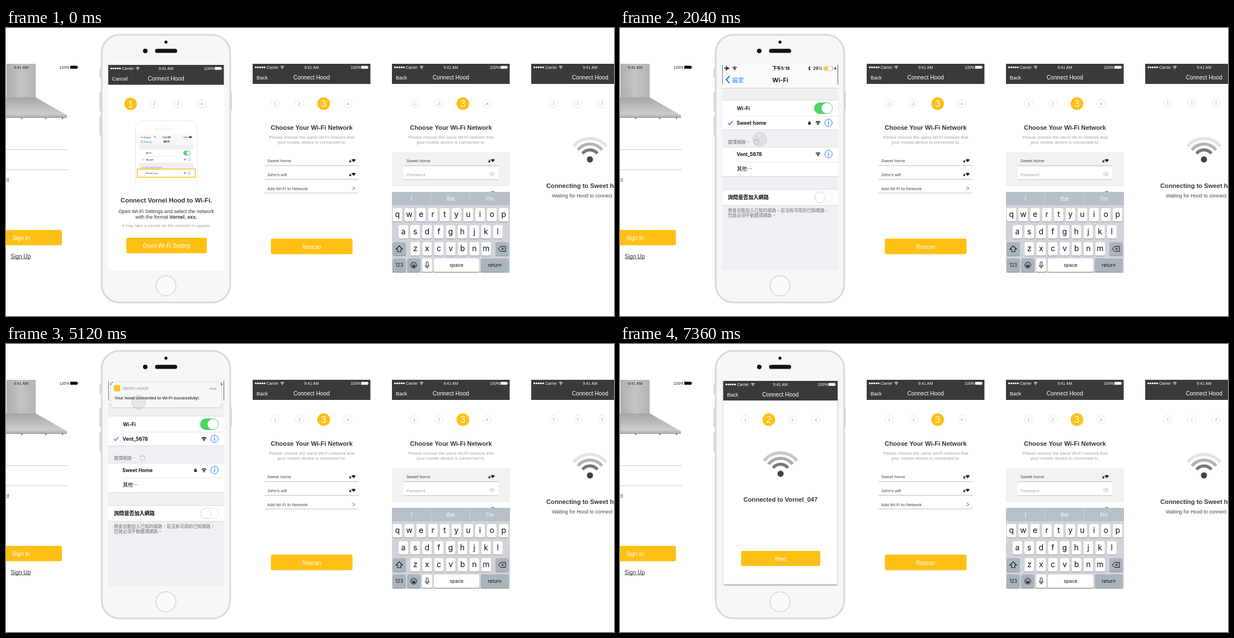
An HTML page with a canvas for the animation above (8.52 s loop, 1087 by 515 pixels).

```html
<!DOCTYPE html>
<html lang="en">
<head>
<meta charset="utf-8">
<title>Hood setup flow</title>
<style>
html, body { margin: 0; width: 100%; height: 100%; overflow: hidden; background: #fff; }
canvas { display: block; }
</style>
</head>
<body>
<canvas id="stage" width="1087" height="515"></canvas>
<script>
const LOOP = 8520;
const YELLOW = '#ffc015', DARK = '#3a3a3a', BLUE = '#0a7aff', INK = '#333';
const SANS = '"Liberation Sans", Arial, sans-serif';
const IOS = 'Inter, "Noto Sans CJK TC", "Noto Sans CJK JP", "Noto Sans CJK", sans-serif';
const stage = document.getElementById('stage').getContext('2d');
let g = stage;

// ---------- helpers ----------
const clamp = v => Math.max(0, Math.min(1, v));
const part = (t, from, to) => clamp((t - from) / (to - from));
const mix = (a, b, p) => a + (b - a) * p;
const easeOut = p => 1 - Math.pow(1 - p, 2.5);
const easeInOut = p => p * p * (3 - 2 * p);
const spring = p => p >= 1 ? 1 : 1 - Math.exp(-8 * p);

function text(s, x, y, size, color = INK, align = 'left', weight = 400, font = SANS) {
  g.font = `${weight} ${size}px ${font}`;
  g.textAlign = align;
  g.fillStyle = color;
  g.fillText(s, x, y + size * 0.36);
}
const center = (s, x, y, size, color, weight) => text(s, x, y, size, color, 'center', weight);
const ios = (s, x, y, size, color = '#000', weight = 600, align = 'left') =>
  text(s, x, y, size, color, align, weight, IOS);

function rect(x1, y1, x2, y2, color) {
  g.fillStyle = color;
  g.fillRect(x1, y1, x2 - x1, y2 - y1);
}
function round(x1, y1, x2, y2, r, fill, stroke, width = 1) {
  g.beginPath();
  g.roundRect(x1, y1, x2 - x1, y2 - y1, r);
  paint(fill, stroke, width);
}
function circle(x, y, r, fill, stroke, width = 1) {
  g.beginPath();
  g.arc(x, y, r, 0, Math.PI * 2);
  paint(fill, stroke, width);
}
function paint(fill, stroke, width) {
  if (fill) { g.fillStyle = fill; g.fill(); }
  if (stroke) { g.strokeStyle = stroke; g.lineWidth = width; g.stroke(); }
}
function path(points, fill, stroke, width = 1, close = false) {
  g.beginPath();
  for (let i = 0; i < points.length; i += 2) g.lineTo(points[i], points[i + 1]);
  if (close) g.closePath();
  paint(fill, stroke, width);
}
function fade(alpha, draw) {
  if (alpha <= 0) return;
  g.save();
  g.globalAlpha *= alpha;
  draw();
  g.restore();
}
function button(x1, y1, x2, y2, label) {
  round(x1, y1, x2, y2, 3, YELLOW);
  center(label, (x1 + x2) / 2, (y1 + y2) / 2 + .5, 10, '#fff');
}

// ---------- icons ----------
function arcs(x, y, radii, colors, width, spread) {
  g.lineWidth = width;
  radii.forEach((r, i) => {
    g.beginPath();
    g.arc(x, y, r, -Math.PI / 2 - spread, -Math.PI / 2 + spread);
    g.strokeStyle = colors[i % colors.length];
    g.stroke();
  });
}
function wifi(x, y, size, color) {
  arcs(x, y + size * .4, [size * .38, size * .72], [color], size * .17, .78);
  circle(x, y + size * .34, size * .14, color);
}
function bigWifi(x, y, outer, middle) {
  arcs(x, y, [17, 27.5, 37.5], ['#777', middle, outer], 5.5, .9);
  circle(x, y, 5.5, '#424242');
}
function wedge(x, y, color = '#222') {
  g.beginPath();
  g.moveTo(x, y + 3.2);
  g.arc(x, y + 3.2, 5.8, -Math.PI / 2 - .74, -Math.PI / 2 + .74);
  g.fillStyle = color;
  g.fill();
}
function lock(x, y, s, color) {
  rect(x - 2 * s, y - .5 * s, x + 2 * s, y + 3 * s, color);
  g.beginPath();
  g.arc(x, y - .8 * s, 1.3 * s, Math.PI, 0);
  paint(null, color, .9 * s);
}
function info(x, y, r) {
  circle(x, y, r, null, BLUE, r * .15);
  rect(x - r * .1, y - r * .2, x + r * .1, y + r * .55, BLUE);
  circle(x, y - r * .48, r * .13, BLUE);
}
const check = (x, y, s) => path([x - 4 * s, y, x - 1.3 * s, y + 3 * s, x + 4 * s, y - 3 * s], null, BLUE, 1.4 * s);
function toggle(x1, y1, x2, y2, on) {
  const r = (y2 - y1) / 2;
  round(x1, y1, x2, y2, r, on ? '#4cd663' : '#fff', on ? '#4cd663' : '#dcdcdc', .8);
  circle(on ? x2 - r : x1 + r, y1 + r, r - .5, '#fff', on ? '#b5ddb9' : '#cfcfcf', .7);
}

// ---------- shared app parts ----------
function header(x, y, w, h, back) {
  const mid = x + w / 2, sy = y + 6.3;
  rect(x, y, x + w, y + h, DARK);
  for (let i = 0; i < 5; i++) circle(x + 5.6 + i * 3.9, sy, 1.6, '#fff');
  text('Carrier', x + 25, sy, 6.8, '#fff');
  wifi(x + 53, sy, 6, '#fff');
  center('9:41 AM', mid, sy, 7, '#fff');
  text('100%', x + w - 17.5, sy, 7, '#fff', 'right');
  rect(x + w - 16.5, sy - 2.5, x + w - 4.5, sy + 2.5, '#fff');
  rect(x + w - 4, sy - 1, x + w - 3, sy + 1, '#fff');
  text(back, x + 7, y + 24.3, 9, '#fff');
  center('Connect Hood', mid, y + 24.3, 10.2, '#fff');
}
function steps(x, gap, active, numSize = 7.5, y = 135) {
  for (let n = 1; n <= 4; n++) {
    const cx = x + (n - 1) * gap;
    if (n === active) {
      circle(cx, y + .3, 11.3, YELLOW);
      center(n, cx, y + .5, 16, '#fff');
    } else {
      circle(cx, y, 7.3, '#fff', '#e6e6e6');
      center(n, cx, y, numSize, '#999');
    }
  }
}
function chooseHead(x) {
  header(x, 64, 210.5, 36, 'Back');
  steps(x + 40.5, 43.2, 3);
  const mid = x + 105.5;
  center('Choose Your Wi-Fi Network', mid, 177.7, 11.2, INK, 700);
  center('Please choose the same Wi-Fi network that', mid, 195, 7.9, '#a0a0a0');
  center('your mobile device is connected to.', mid, 204.5, 7.9, '#a0a0a0');
}
function network(name, x, y) {
  text(name, x, y, 7.7, '#444');
  lock(x + 148.5, y + .3, .8, '#222');
  wedge(x + 154.5, y - .6);
}

// ---------- side screens ----------
function loginScreen() {
  const flue = g.createLinearGradient(0, 0, 53, 0);
  ['#adadad', '#c4c4c4', '#b4b4b4'].forEach((c, i) => flue.addColorStop(i / 2, c));
  rect(1, 64, 53, 125, flue);
  const cone = g.createLinearGradient(0, 124, 0, 157);
  cone.addColorStop(0, '#a6a6a6');
  cone.addColorStop(1, '#d0d0d0');
  path([0, 124, 53, 124, 109, 156, 0, 156], cone);
  rect(0, 155, 109, 160, '#bdbdbd');
  rect(0, 159, 109, 160.5, '#8e8e8e');
  [28, 71, 101].forEach(x => rect(x - 1, 160, x + 1, 163, '#777'));
  center('9:41 AM', 27, 70.3, 7, '#222');
  text('100%', 113.5, 70.3, 7, '#222', 'right');
  rect(115, 67.5, 127.5, 72.8, '#000');
  rect(128, 69, 129, 71, '#000');
  rect(0, 217, 111, 218, '#ccc');
  rect(0, 253, 111, 254, '#ccc');
  text('Forgot password', 5.5, 270.3, 7.7, '#444', 'right');
  rect(0, 274, 5.5, 274.7, '#555');
  button(-46, 361, 100, 388.5, 'Sign In');
  center('Sign Up', 26.3, 408, 10.1, INK);
  rect(8.5, 412.5, 44, 413.3, INK);
}
function listScreen() {
  chooseHead(441);
  network('Sweet home', 467, 237.5);
  network("John's wifi", 467, 262);
  text('Add Wi-Fi to Network', 467, 287, 7.7, '#444');
  path([619.5, 284, 624, 286.8, 619.5, 289.6], null, '#555', .9);
  [246, 270.5, 295].forEach(y => rect(462, y - .5, 630.5, y + .5, '#bdbdbd'));
  button(473.5, 376.5, 619.5, 404.5, 'Rescan');
}
function key(x1, y1, x2, dark, label, size = 14) {
  round(x1, y1 + 1, x2, y1 + 25, 3, '#8d9299');
  round(x1, y1, x2, y1 + 24, 3, dark ? '#abb3bd' : '#fff');
  if (label) text(label, (x1 + x2) / 2, y1 + 12 - (size > 10 ? 1 : 0), size, '#111', 'center', 400, IOS);
}
function keyRow(letters, x, y) {
  [...letters].forEach((c, i) => key(x + i * 21.1 - 8.6, y, x + i * 21.1 + 8.6, false, c));
}
function keyboard() {
  rect(690, 293, 901, 317.5, '#b8bfc8');
  rect(690, 317.5, 901, 438, '#d0d4da');
  [['I', 725], ['the', 795], ["I'm", 865]].forEach(([s, x]) => center(s, x, 305, 10.3, '#fff'));
  rect(759, 296, 759.7, 315, '#d3d8de');
  rect(829, 296, 829.7, 315, '#d3d8de');
  keyRow('qwertyuiop', 699.8, 322);
  keyRow('asdfghjkl', 710.5, 352.5);
  keyRow('zxcvbnm', 731.8, 383);
  key(691.5, 383, 715, true);
  path([703, 389.5, 709, 395.5, 706, 395.5, 706, 400, 700, 400, 700, 395.5, 697, 395.5], null, '#111', 1.1, true);
  key(875, 383, 898.5, true);
  path([880, 395, 884.5, 390.5, 893, 390.5, 893, 399.5, 884.5, 399.5], null, '#111', 1, true);
  path([885.5, 392.7, 890, 397.2], null, '#111');
  path([890, 392.7, 885.5, 397.2], null, '#111');
  key(691.5, 412, 714.5, true, '123', 8.5);
  key(717.5, 412, 740.5, true);
  circle(729, 424, 5.2, null, '#111');
  circle(727.2, 422.4, .8, '#111');
  circle(730.8, 422.4, .8, '#111');
  g.beginPath();
  g.arc(729, 424.5, 3.1, 0, Math.PI);
  g.fillStyle = '#111';
  g.fill();
  key(744, 412, 762, false);
  round(751.2, 418, 754.8, 426, 1.8, null, '#111');
  g.beginPath();
  g.arc(753, 424, 3.7, 0, Math.PI);
  paint(null, '#111', .9);
  path([753, 427.5, 753, 430], null, '#111');
  key(765, 412, 846, false, 'space', 8.6);
  key(849, 412, 898.5, true, 'return', 8.6);
}
function passwordScreen() {
  chooseHead(690);
  rect(690, 222, 901, 283, '#f2f2f2');
  network('Sweet home', 715.7, 237.5);
  rect(711, 247, 880, 271, '#fff');
  rect(711, 245.8, 880, 246.8, '#bdbdbd');
  rect(711, 270.5, 880, 271.5, '#bdbdbd');
  text('Password', 715.7, 262, 7.7, '#a5a5a5');
  g.beginPath();
  g.ellipse(869, 261, 5, 3, 0, 0, Math.PI * 2);
  paint(null, '#bbb', .9);
  circle(869, 261, 1.4, '#bbb');
  wedge(870.2, 294.6);
  keyboard();
}
function connectingScreen() {
  header(939, 64, 210.5, 36, '');
  steps(979, 43.2, 4, 6.5);
  bigWifi(1044, 235, '#e3e3e3', '#b4b4b4');
  text('Connecting to Sweet home', 966, 282.3, 11.2, INK, 'left', 700);
  text('Waiting for Hood to connect', 976, 300, 8.8, '#444');
}
function phoneBody() {
  const metal = '#d9d9db';
  [[72, 89], [114, 149], [157, 192]].forEach(([a, b]) => round(167, a, 171, b, 1, metal));
  round(401, 113, 404, 148, 1, metal);
  round(171, 12.3, 400.8, 490.8, 32, '#f8f6f7', metal, 3);
  circle(286, 25.2, 2.7, '#111');
  circle(249, 41, 4.1, '#111');
  round(266.5, 37.3, 306, 44.5, 3.6, '#111');
  circle(286, 461, 17.8, '#fbfafa', '#cfcfcf', 1.3);
}

// ---------- phone screens ----------
function miniPhone() {
  round(231.5, 166, 342, 330, 13, '#fff', '#e6e6e6');
  round(267, 179.5, 300, 183, 1.8, '#fff', '#ececec', .8);
  circle(283.5, 171.5, 1, null, '#e8e8e8', .6);
  circle(269, 181, 1.3, null, '#e8e8e8', .6);
  rect(238, 190.5, 335.5, 330, '#fff');
  rect(238, 190.5, 335.5, 209, '#f8f8f9');
  text('•••• Carrier', 240, 195.3, 4, '#222');
  wifi(266, 195, 3.2, '#222');
  center('3:11 PM', 287, 195.3, 4, '#222', 700);
  text('• 43%', 315, 195.3, 4, '#222');
  rect(327, 193.8, 332, 196.5, '#333');
  path([243.5, 200.8, 241.3, 203.4, 243.5, 206], null, BLUE, .9);
  text('Settings', 245.5, 203.6, 4.3, BLUE);
  center('Wi-Fi', 287, 203.6, 4.6, '#111', 700);
  rect(238, 209, 335.5, 217, '#efeff4');
  text('Wi-Fi', 250, 223.6, 4.4, '#111');
  toggle(317.5, 219.7, 330, 227.3, true);
  rect(250, 229.5, 335.5, 230, '#ddd');
  check(244.5, 235, .45);
  text('My wifi', 250, 235.6, 4.4, '#111');
  wifi(320, 235.3, 3.6, '#222');
  info(327.5, 235.3, 2.7);
  rect(238, 241, 335.5, 253, '#efeff4');
  text('CHOOSE A NETWORK...', 242, 249.5, 3.5, '#888');
  rect(234.8, 252.5, 338.3, 266.8, '#fff');
  g.lineWidth = 1.5;
  g.strokeStyle = YELLOW;
  g.strokeRect(234.8, 252.3, 103.6, 14.6);
  text('Vornel_xxx', 250, 259.7, 4.4, '#111');
  wifi(320, 259.6, 3.6, '#222');
  info(327.5, 259.6, 2.7);
  const haze = g.createLinearGradient(0, 268, 0, 292);
  haze.addColorStop(0, 'rgba(255,255,255,.3)');
  haze.addColorStop(1, '#fff');
  rect(229, 268, 345, 292, haze);
  rect(229, 292, 345, 332, '#fff');
}
function startScreen() {
  rect(183, 66, 390, 433.5, '#fff');
  header(182.5, 66, 207, 35.5, 'Cancel');
  steps(222.7, 42.5, 1, 7.5, 135.5);
  miniPhone();
  center('Connect Vornel Hood to Wi-Fi.', 286.5, 308, 11.4, INK, 700);
  center('Open Wi-Fi Settings and select the network', 286.5, 327.5, 8.9, INK);
  const lead = 'with the format ', name = 'Vornel_xxx.';
  g.font = `400 8.9px ${SANS}`;
  const leadW = g.measureText(lead).width;
  g.font = `700 8.9px ${SANS}`;
  const x = 286.5 - (leadW + g.measureText(name).width) / 2;
  text(lead, x, 338, 8.9);
  text(name, x + leadW, 338, 8.9, INK, 'left', 700);
  center('It may take a minute for the network to appear.', 286.5, 353.5, 7.7, '#a0a0a0');
  button(215, 375, 359, 402.7, 'Open Wi-Fi Setting');
}
function settingsRow(name, y, locked, x = 208.5) {
  ios(name, x, y, 8.9);
  if (locked) lock(338.7, y - .3, 1.1, '#000');
  wifi(354, y, 8.2, '#000');
  info(372.8, y, 6.6);
}
function settingsStatus() {
  path([187, 72, 195.5, 72], null, '#000', 1.6);
  path([189.5, 68, 192.5, 72, 189.5, 76], null, '#000', 1.3);
  path([187, 70, 188.3, 72, 187, 74], null, '#000', .8);
  wifi(205, 72, 7.6, '#000');
  ios('下午5:18', 288, 72.3, 7.8, '#000', 600, 'center');
  path([336.5, 70.5, 340.5, 74, 338.5, 76, 338.5, 68.5, 340.5, 70.5, 336.5, 74], null, '#000', .8);
  ios('29%', 345, 72.3, 7.7, '#000', 500);
  round(364.5, 68.7, 380, 76, 1.5, '#fff', '#999', .7);
  rect(365.5, 69.7, 371.5, 75, '#ffcc00');
  rect(380.7, 71, 381.7, 74, '#999');
  path([385.8, 68.5, 383, 73, 384.8, 73, 384, 76, 387, 71.5, 385, 71.5], '#000');
}
function settingsScreen(swap = 0, settle = 0) {
  rect(183, 66, 390, 433.5, '#efeff4');
  rect(183, 66, 390, 107.5, '#fbfbfc');
  [[129, 182], [213, 265.3], [289, 317]].forEach(([a, b]) => {
    rect(183, a, 390, b, '#fff');
    rect(183, a - .3, 390, a + .3, '#c8c7cc');
    rect(183, b - .3, 390, b + .3, '#c8c7cc');
  });
  rect(183, 107, 390, 107.6, '#b9b9bd');
  rect(209, 157, 390, 157.6, '#d5d5d8');
  rect(209, 239, 390, 239.6, '#d5d5d8');
  rect(182.8, 66, 183.6, 101, '#333');
  rect(389, 66, 389.8, 101, '#333');
  settingsStatus();
  path([196, 86, 190, 92.3, 196, 98.6], null, BLUE, 2);
  ios('設定', 200.5, 92.8, 10.6, BLUE, 400);
  ios('Wi-Fi', 286.5, 92.6, 11, '#000', 600, 'center');
  ios('Wi-Fi', 209, 144, 8.9);
  toggle(347.5, 133.5, 380, 153.5, true);
  ios('選擇網路⋯', 193, 203.7, 7.9, '#6d6d72', 400);
  for (let i = 0; i < 8; i++) {
    const a = i * Math.PI / 4, c = Math.cos(a), s = Math.sin(a);
    path([244 + c * 3, 204 + s * 3, 244 + c * 5.8, 204 + s * 5.8], null, i > 4 ? '#999' : '#bbb', 1.1);
  }
  ios('其他⋯', 209, 251.3, 9, '#000', 500);
  ios('詢問是否加入網路', 193, 303, 9.1);
  toggle(348, 293, 380, 312.5, false);
  ios('將會自動加入已知的網路。若沒有可用的已知網路，', 193, 325.7, 7.85, '#6d6d72', 400);
  ios('您就必須手動選擇網路。', 193, 335, 7.85, '#6d6d72', 400);

  // the chosen network travels up while the old one takes its place
  if (settle < 1) settingsRow('Sweet home', 169.6, true);
  if (settle < 1 && swap < .5) check(197, 170, 1);
  if (swap === 0) {
    settingsRow('Vent_5678', 225.5);
    return;
  }
  fade(Math.min(1, swap * 1.3), () => settingsRow('Sweet Home', 225.5, true, 208));
  const y = mix(225.5, 169.6, swap);
  if (settle < 1) {
    rect(183, y - 11.5, 390, y + 11.5, '#fff');
    fade(1 - settle, () => rect(183, y - 11.5, 390, y + 11.5, '#bcbcbc'));
  }
  settingsRow('Vent_5678', y);
  fade(settle, () => check(197, y, 1));
}
function banner(p) {
  if (p <= 0) return;
  g.save();
  g.translate(0, mix(-60, 0, p));
  g.shadowColor = 'rgba(0,0,0,.25)';
  g.shadowBlur = 3;
  round(187.5, 68, 385, 113, 6, '#f7f7f7');
  g.shadowColor = 'transparent';
  round(193, 73.5, 204, 84.5, 2, YELLOW);
  text('TAVRO HOOD', 208, 79, 7.2, '#888');
  text('now', 376.5, 79, 7.2, '#888', 'right');
  text('Your hood connected to Wi-Fi successfully!.', 194, 95.7, 7.9, '#000');
  g.restore();
}
function doneScreen() {
  g.save();
  g.shadowColor = 'rgba(0,0,0,.6)';
  g.shadowBlur = 2.5;
  g.shadowOffsetY = .5;
  rect(184.5, 66, 389, 430, '#fff');
  g.restore();
  header(184.5, 66, 204.5, 35, 'Back');
  steps(224, 42, 2);
  bigWifi(287, 232, '#c8c8c8', '#aaa');
  center('Connected to Vornel_047', 287, 277.7, 11.1, INK, 700);
  button(216.5, 370, 358, 397, 'Next');
}

// ---------- app switcher ----------
function card(x, y, s, draw) {
  g.save();
  g.translate(x, y);
  g.scale(s, s);
  g.translate(-183, -66);
  g.beginPath();
  g.roundRect(183, 66, 207, 368, s < .99 ? 5 : 0);
  g.clip();
  draw();
  g.restore();
}
function wallpaper() {
  const base = g.createLinearGradient(0, 66, 0, 433);
  ['#2b3836', '#30463d', '#38523f', '#365047', '#486356'].forEach((c, i) => base.addColorStop(i / 4, c));
  rect(183, 66, 390, 433.5, base);
  const spots = [
    [205, 85, '40,76,56'], [372, 85, '38,76,58'], [213, 402, '38,88,134'],
    [262, 402, '56,78,112'], [310, 402, '46,92,126'], [358, 402, '50,128,78']
  ];
  spots.forEach(([x, y, rgb]) => {
    const glow = g.createRadialGradient(x, y, 9, x, y, 25);
    glow.addColorStop(0, `rgba(${rgb},.9)`);
    glow.addColorStop(1, `rgba(${rgb},0)`);
    rect(x - 25, y - 25, x + 25, y + 25, glow);
  });
}
function switcher(open, zoom) {
  wallpaper();
  const out = 1 - open;
  card(mix(210.5 - 134 * out, 183, zoom), mix(mix(66, 112, open), 66, zoom),
    mix(mix(1, .729, open), 1, zoom), () => settingsScreen());
  card(mix(183, 291.2, open) + zoom * 125, mix(mix(66, 107.9, open), 66, zoom),
    mix(mix(1, .745, open), 1, zoom), startScreen);
  fade(open * (1 - zoom), () => {
    round(218, 88.5, 236.5, 106.5, 4, '#8b8d90');
    ios('Settings', 241.5, 97.5, 9.2, '#fff');
    round(297, 84, 316, 103, 4, YELLOW);
    ios('Tavro Hood', 321.5, 93.7, 9.2, '#fff');
  });
}

// ---------- timeline ----------
function touch(t) {
  let x, y, alpha = 1;
  if (t < 4520) {
    const a = easeInOut(part(t, 960, 1360)), b = easeInOut(part(t, 2320, 2680));
    x = mix(mix(307, 250, a), 249, b);
    y = mix(mix(149.5, 199, a), 221, b);
    alpha = part(t, 360, 640);
  } else if (t < 6300) {
    const p = easeInOut(part(t, 4520, 5240));
    x = mix(249, 236, p);
    y = mix(221, 95, p);
    alpha = 1 - part(t, 5640, 6200);
  } else {
    const p = easeInOut(part(t, 6280, 6760));
    x = mix(271, 287, p);
    y = mix(277, 377, p);
    alpha = part(t, 6280, 6440) * (1 - part(t, 7040, 7360));
  }
  fade(alpha, () => circle(x, y, 12.3, 'rgba(120,120,120,.13)', 'rgba(100,100,100,.28)', .8));
}
function layer(draw) {
  const c = document.createElement('canvas');
  c.width = 1087;
  c.height = 515;
  g = c.getContext('2d');
  draw();
  g = stage;
  return c;
}
const backdrop = layer(() => {
  rect(0, 0, 1087, 515, '#fff');
  loginScreen();
  phoneBody();
  listScreen();
  passwordScreen();
  connectingScreen();
});
const done = layer(doneScreen);

function phoneScreen(t) {
  rect(183, 66, 390, 433.5, '#fff');
  if (t < 400) return startScreen();
  if (t < 2040) return switcher(easeOut(part(t, 360, 840)), easeOut(part(t, 1640, 2040)));
  const show = spring(part(t, 5400, 6280));
  if (show < .996) {
    settingsScreen(spring(part(t, 3000, 3840)), part(t, 3400, 3880));
    banner(easeOut(part(t, 3880, 4400)));
  }
  fade(show, () => g.drawImage(done, 0, (1 - show) * 164));
}
function frame(now) {
  const t = now % LOOP;
  g.drawImage(backdrop, 0, 0);
  g.save();
  g.beginPath();
  g.rect(182.5, 65.5, 207.5, 368);
  g.clip();
  phoneScreen(t);
  touch(t);
  g.restore();
  requestAnimationFrame(next => frame(Math.max(0, next - start)));
}
const start = performance.now();
frame(0);
</script>
</body>
</html>
```
